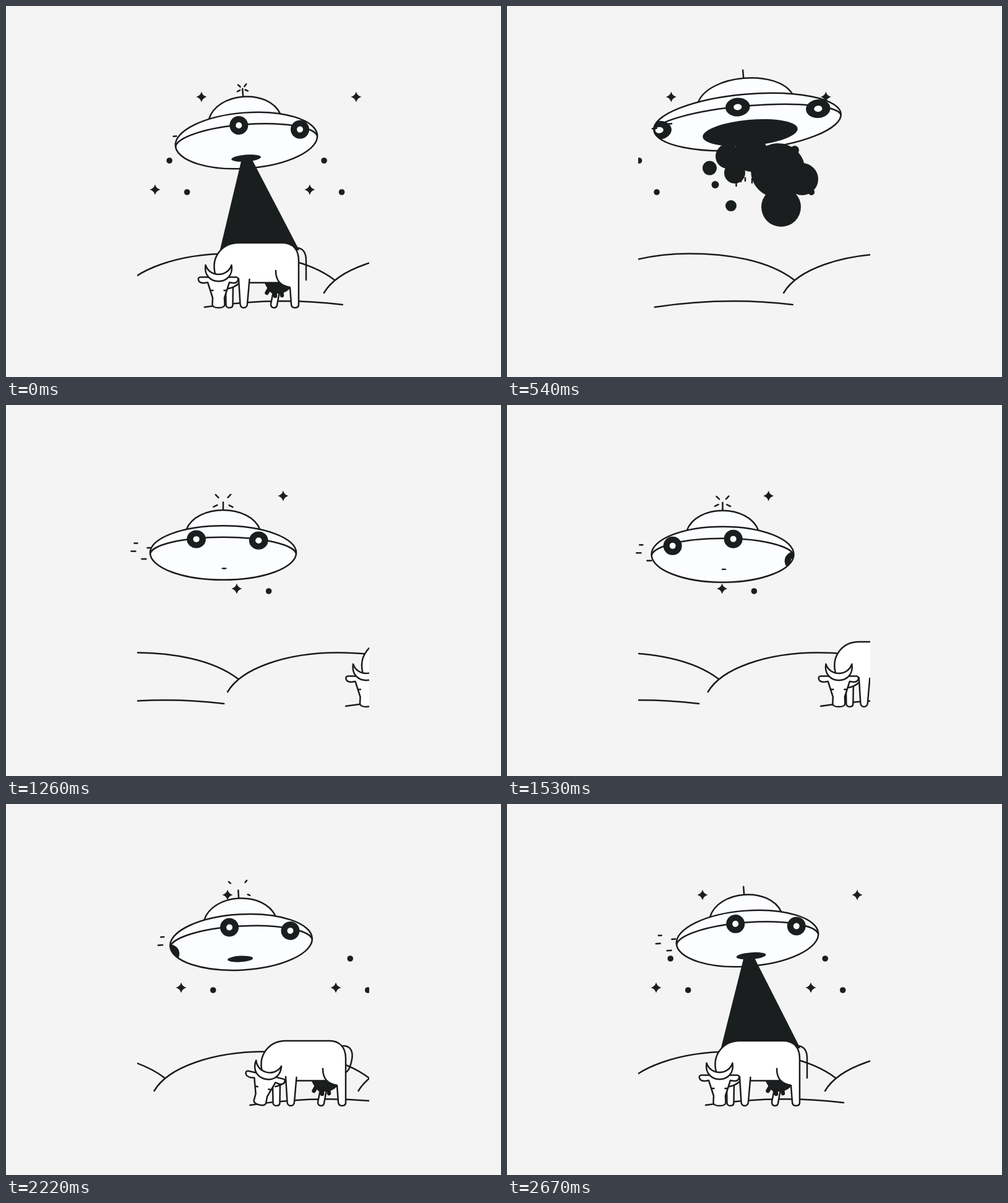
These frames come from a looping animation (800 px wide and 600 px high, 2700 ms). An HTML page with a canvas:

```html
<!DOCTYPE html>
<html lang="en">
<head>
<meta charset="utf-8">
<title>Abduction</title>
<style>
html, body { margin: 0; width: 100%; height: 100%; overflow: hidden; background: #f4f4f4; }
canvas { display: block; }
</style>
</head>
<body>
<canvas id="stage" width="800" height="600"></canvas>
<script>
const ctx = document.getElementById('stage').getContext('2d');
const LOOP = 2700, END = 2670;
const INK = '#1b1b1d', DARK = '#1a1e1e', HULL = '#fcfdff';

const clamp = v => Math.max(0, Math.min(1, v));
const ramp = (t, a, b) => clamp((t - a) / (b - a));
const smooth = v => v * v * (3 - 2 * v);

// Rows are [time, ...values]; values are joined by smooth curves or straight lines.
function track(rows, t, curved = true) {
  let i = 0;
  while (i < rows.length - 2 && t >= rows[i + 1][0]) i++;
  const a = rows[i], b = rows[i + 1], span = b[0] - a[0], u = (t - a[0]) / span;
  const slope = (j, n) => {
    const p = rows[j - 1], q = rows[j + 1];
    if (!p || !q) return 0;
    const before = (rows[j][n] - p[n]) / (rows[j][0] - p[0]);
    const after = (q[n] - rows[j][n]) / (q[0] - rows[j][0]);
    return before * after > 0 ? 2 * before * after / (before + after) : 0;
  };
  return a.slice(1).map((v, k) => {
    const n = k + 1, d = b[n] - v;
    if (!curved) return v + d * u;
    const m0 = slope(i, n) * span, m1 = slope(i + 1, n) * span;
    return v + d * u * u * (3 - 2 * u) + m0 * u * (1 - u) * (1 - u) - m1 * u * u * (1 - u);
  });
}

// x, y, scale x, scale y, tilt in degrees
const SHIP = [
  [0, 388.5, 217.5, 1, 1, -4.3], [250, 388.5, 213, .97, 1.03, -4.3],
  [540, 388.5, 187.5, 1.32, 1, -5], [610, 386, 188, 1.2, 1.07, -4.2],
  [740, 376, 205, .94, 1.18, -2], [960, 363, 227.5, .95, 1.19, 0],
  [1200, 352, 238, 1.03, .97, 0], [1530, 348.5, 241.7, 1, 1, 0],
  [1950, 354.5, 239.5, 1, 1, -.5], [2220, 380, 223.5, 1, 1, -3.2],
  [2420, 387.5, 218.5, 1, 1, -4.1], [END, 388.5, 217.5, 1, 1, -4.3]];
// x, y, radius x, radius y
const HOLE = [
  [0, -2.5, 28.5, 24, 5.5], [300, 0, 26, 36, 9], [540, 3, 17.8, 77, 21], [780, 2, 24, 22, 7],
  [960, 1, 26.5, 5, 2], [1530, 2, 24, 4, 1.2], [1950, .5, 23.5, 7, 2],
  [2220, -3, 27, 20.5, 5], [END, 4, 28.5, 24, 5.5]];
const SPIN = [[0, 0], [540, 1], [960, 2], [1530, 3.28], [1950, 4.28], [2220, 4.925], [END, 5.929]];
const WIND = [[0, -12], [540, 65], [960, 110], [1530, 185], [1950, 241], [2220, 270], [END, 329]];
// y, x, length, first and last drift
const STREAKS = [[-15.5, -130, 6, -14, 18], [-2.5, -135, 8, -4, 23], [-8, -109, 7, 10, 25], [10, -118, 8, 3, 18]];
// x, y, radius
const SMOKE = [
  [357, 243, 20], [368, 270, 17], [327.5, 262, 11.5], [336.5, 289, 6], [362, 323, 9], [395, 240, 28],
  [438, 266, 44], [477, 280, 26], [443, 325, 32], [465, 233, 7], [492, 301, 5]];

const hill = new Path2D('M0 464C22 426 95 400.5 178 400.5C240 400.5 305 411 347 443');
const ground = new Path2D('M321 487Q435 470 544 483');
const star = new Path2D('M0-8.5Q1.8-1.8 8.5 0Q1.8 1.8 0 8.5Q-1.8 1.8-8.5 0Q-1.8-1.8 0-8.5Z');
const farLegs = new Path2D('M355 452L355.5 483Q356 488 361 488Q366.5 488 366.5 483L367 450M432 462L428 482Q428 488 433 488Q437.5 488 438 484L442 462');
const torso = new Path2D('M338 433C331 405 350 383 376 383H447C464 383 473 395 473 411V483Q473 488 467 488Q461 488 461 482L459 455Q447 453 442 447.5H378Q368 455 358 457Z');
const torsoLines = new Path2D('M338 433C331 405 350 383 376 383H447C464 383 473 395 473 411V483Q473 488 467 488Q461 488 461 482L459 455C444 452 436 445 436 428M393 447.5H440M377 448Q368 456 359 457');
const udder = new Path2D('M417 446H447Q452 454 460 456Q452 464 444 465H430Q423 460 417 446Z');
const teats = new Path2D('M425 458L421.5 464M435 462V469M445 462L446 468');
const nearLeg = new Path2D('M376 441L378.5 482Q379 488 384 488Q389.5 488 390 482L393.5 442');
const face = new Path2D('M314 438.5H372Q376 439 375 443Q374 448 367 448L361 447L353 472L353.5 483Q353 488 343.5 488Q334 488 333.5 483L334 472L326 447L320 448Q312 448 311 443Q310 439 314 438.5Z');
const horns = new Path2D('M322.5 419C317 454 370 454 364.5 419C358 439 329 439 322.5 419Z');

const line = path => { ctx.strokeStyle = INK; ctx.stroke(path); };
const solid = (path, color = DARK) => { ctx.fillStyle = color; ctx.fill(path); };
const outlined = (path, color = '#fff') => { solid(path, color); line(path); };

function at(x, y, draw, angle = 0, sx = 1, sy = sx) {
  ctx.save();
  ctx.translate(x, y);
  ctx.rotate(angle);
  ctx.scale(sx, sy);
  draw();
  ctx.restore();
}

function oval(x, y, rx, ry = rx) {
  const p = new Path2D();
  p.ellipse(x, y, rx, ry, 0, 0, 7);
  return p;
}

function segment(x1, y1, x2, y2) {
  ctx.beginPath();
  ctx.moveTo(x1, y1);
  ctx.lineTo(x2, y2);
  ctx.strokeStyle = INK;
  ctx.stroke();
}

function sky(t) {
  const shift = 250 * t / END;
  for (let k = 0; k < 3; k++) {
    const x = 250 * k - shift;
    at(316 + x, 147, () => solid(star));
    at(241 + x, 297, () => solid(star));
    solid(oval(264.2 + x, 250, 4.8));
    solid(oval(292.7 + x, 301, 4.8));
  }
}

function land(t) {
  for (let k = 0; k < 3; k++) at(184 + 330 * (k - t / END), 0, () => line(hill));
  const [shift] = track([[0, 0], [1440, 219], [END, 420]], t, false);
  for (let k = 0; k < 2; k++) at(420 * k - shift, 0, () => line(ground));
}

function cowBody(nod) {
  const w = nod, tail = new Path2D(
    `M467 391.5C480 390 485.5 399 ${485 - 2 * w} 413C${485 - 5 * w} 428 ${485 - 8 * w} ${438 - 4 * w} ${485 - 17 * w} ${443 - 7 * w}`);
  line(tail);
  outlined(farLegs);
  solid(udder);
  ctx.lineWidth = 6.5;
  line(teats);
  ctx.lineWidth = 2.5;
  solid(torso, '#fff');
  line(torsoLines);
  outlined(nearLeg);
  at(345, 442, () => {
    ctx.translate(-345, -442);
    outlined(face);
    outlined(horns);
    segment(331.5, 460, 334.5, 460);
    segment(352.5, 460, 355.5, 460);
  }, nod * .225);
}

function cow(t) {
  if (t > 1000) {
    const nod = smooth(ramp(t, 1980, 2200)) * (1 - smooth(ramp(t, 2260, 2480)));
    at((END - t) * .1693, 0, () => cowBody(nod));
  } else if (t < 430) {
    const k = ramp(t, 30, 430) ** 2;
    at(405 - 13 * k, 440 - 230 * k, () => { ctx.translate(-405, -440); cowBody(0); }, 0, 1 - .88 * k);
  }
}

function beam(t) {
  const grow = t > 2000 ? smooth(ramp(t, 2400, 2600)) : 1 - smooth(ramp(t, 300, 470));
  if (!grow) return;
  const top = 389 + (t > 2000 ? 2 : 0), y = 247 - 25 * ramp(t, 200, 470) * (t < 1000);
  ctx.beginPath();
  ctx.moveTo(top - 8, y);
  ctx.lineTo(top + 8, y);
  ctx.lineTo(top + 8 + (466 - top) * grow, y + 148 * grow);
  ctx.lineTo(top - 8 + (352 - top) * grow, y + 155 * grow);
  ctx.fillStyle = DARK;
  ctx.fill();
}

function sparks(t) {
  const q = (t / 300 + .15) % 1 / .7;
  if (q < .1 || q >= 1 || (t > 530 && t < 1090)) return;
  const outer = 1 - (1 - q) ** 2.4;
  for (const [x, y] of [[-15, -15], [15, -15.5], [-19, 9], [19, 9.5]])
    segment(x * q, y * q, x * outer, y * outer);
}

function ship(t) {
  const [x, y, sx, sy, tilt] = track(SHIP, t);
  const angle = tilt * Math.PI / 180;
  // Scales the geometry only, so that line weights stay even.
  const fit = path => {
    const p = new Path2D();
    p.addPath(path, new DOMMatrix([sx, 0, 0, sy, 0, 0]));
    return p;
  };
  at(x, y, () => {
    line(fit(new Path2D('M0-71V-84')));
    outlined(fit(new Path2D('M-58-38.5C-50-60-25-71 0-71C25-71 50-60 58-38.5')), HULL);
    const hull = fit(oval(0, 0, 115, 45));
    solid(hull, HULL);
    ctx.save();
    ctx.clip(hull);
    line(fit(new Path2D('M-115 3A115 29 0 0 1 115 3')));
    const spin = track(SPIN, t, false)[0] % 1;
    const lag = 40 * clamp(1 - Math.min(t, END - t) / 300);
    for (let k = -2; k < 2; k++) {
      let wx = -10.5 + 98 * (spin + k);
      if (wx < -60) wx -= lag;
      const wy = 15.5 - 41 * Math.sqrt(Math.max(0, 1 - (wx / 116) ** 2));
      solid(fit(oval(wx, wy, 15)));
      solid(fit(oval(wx, wy, 5)), '#fff');
    }
    ctx.restore();
    line(hull);
    solid(oval(...track(HOLE, t)));
    at(0, -84 * sy, () => sparks(t));
    const drift = (track(WIND, t, false)[0] + 20) % 45 - 20;
    for (const [ly, lx, length, first, last] of STREAKS)
      if (drift > first && drift < last) {
        const left = lx - drift + 1;
        segment(left, ly, Math.max(left + 2, left + length - 1), ly);
      }
  }, angle);
}

function smoke(t) {
  const size = smooth(ramp(t, 400, 530)) * (1 - smooth(ramp(t, 550, 800)));
  if (!size) return;
  const drop = (t - 540) * .06;
  for (const [x, y, r] of SMOKE) solid(oval(x, y + drop, r * size));
  if (t > 490 && t < 600)
    for (const [x, y, h] of [[370.5, 284, 7], [378, 283, 1], [385, 278, 5], [396, 279, 7]]) segment(x, y, x, y + h);
}

function clipped(draw) {
  ctx.save();
  ctx.beginPath();
  ctx.rect(212, 0, 375, 600);
  ctx.clip();
  draw();
  ctx.restore();
}

function frame() {
  const t = Math.min(performance.now() % LOOP, END);
  ctx.fillStyle = '#f4f4f4';
  ctx.fillRect(0, 0, 800, 600);
  ctx.lineWidth = 2.5;
  ctx.lineCap = ctx.lineJoin = 'round';
  clipped(() => { sky(t); land(t); });
  ship(t);
  clipped(() => { beam(t); cow(t); smoke(t); });
  requestAnimationFrame(frame);
}
frame();
</script>
</body>
</html>
```
